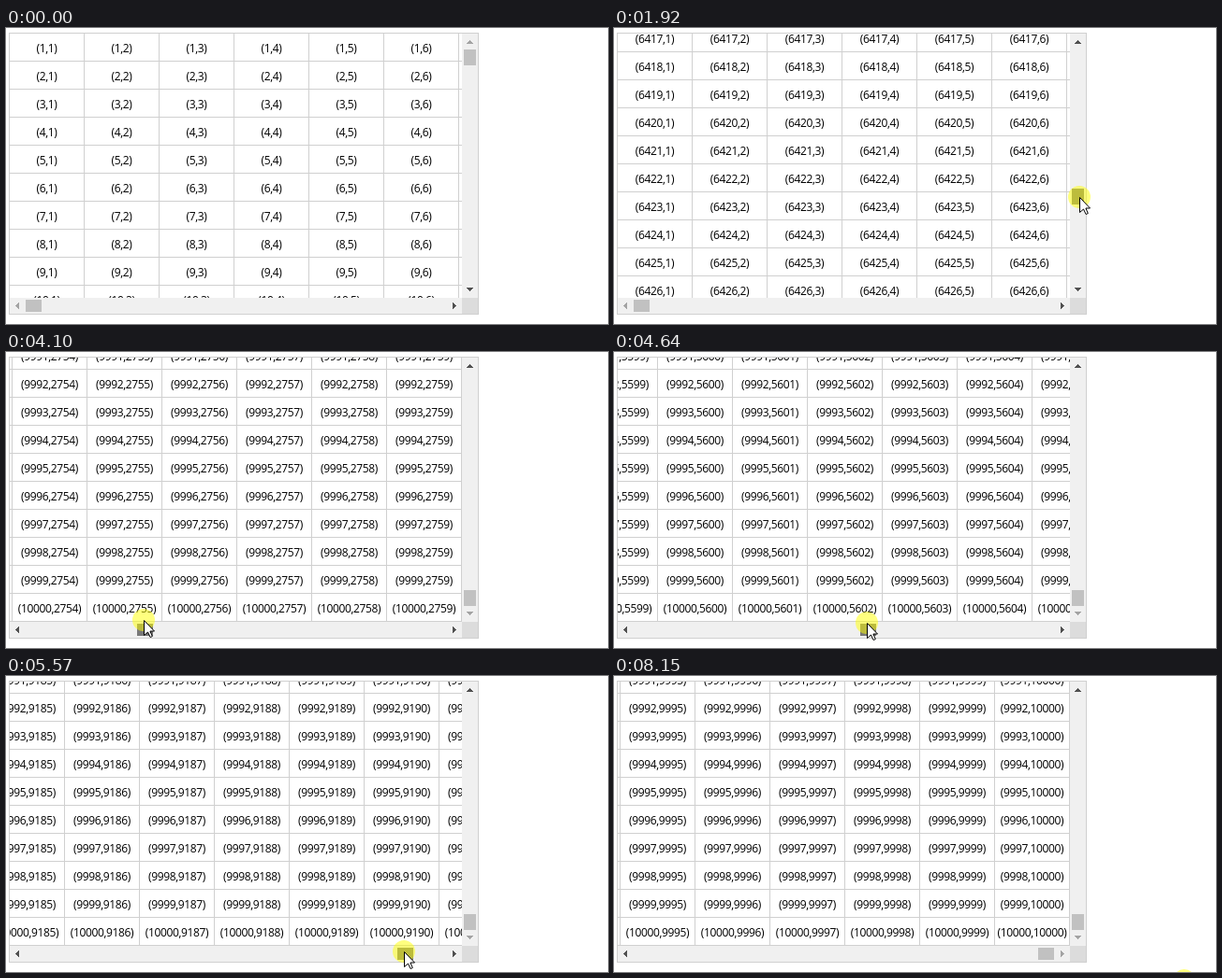
An HTML page with a canvas that plays this animation: 643x317 px, repeating every 8.23 s.

```html
<!DOCTYPE html>
<html lang="en">
<head>
<meta charset="utf-8">
<title>Virtual scrolling grid</title>
<style>
html, body { margin: 0; width: 100%; height: 100%; overflow: hidden; background: #fff; }
canvas { display: block; }
</style>
</head>
<body>
<canvas id="stage" width="643" height="317"></canvas>
<script>
const ctx = document.getElementById('stage').getContext('2d', { alpha: false });

const LOOP = 8230, FIRST_STEP = 208, STEP = 77.6;
const VIEW = { x: 4, y: 6, w: 483, h: 283 };
const CELL = { w: 80, h: 30 };
const COUNT = 10000;
const TRAVEL = { x: 432, y: 232 };           // thumb range in pixels
const DRAG_Y = [11, 30], DRAG_X = [43, 75];  // first and last step of each drag
const LAST_CLICK = 102;
const LINE = '#d0d0d0', BAR = '#f0f0f0';

const clamp = (v, lo, hi) => Math.min(hi, Math.max(lo, v));
const linear = f => f;
const easeIn = f => f * f;
const easeOut = f => 1 - (1 - f) ** 2;

// Each leg continues where the one before it ended; the pointer rests in the gaps.
const ENTRY = { x: 533, y: 275 };
const leg = (from, to, x, y, ease = linear) => ({ from, to, x, y, ease });
const LEGS = [
  leg(0, 10, 496, 32, easeOut),    // to the vertical thumb
  leg(11, 30, 498, 288.5),         // drag to the last row
  leg(30, 35, 150, 296, easeIn),   // to the horizontal thumb
  leg(35, 41, 28, 292, easeOut),
  leg(43, 50, 147, 287),           // drag to the last column
  leg(50, 64, 393, 293),
  leg(64, 75, 464, 297),
  leg(76, 78, 477, 297),           // release and leave
  leg(82, 88, 408, 247, easeOut),
  leg(88, 93, 543, 293),
  leg(93, 98, 609, 326)
];

function pointerAt(step) {
  let { x, y } = ENTRY;
  for (const { from, to, x: endX, y: endY, ease } of LEGS) {
    const f = ease(clamp((step - from) / (to - from), 0, 1));
    x += (endX - x) * f;
    y += (endY - y) * f;
  }
  return { x: Math.round(x), y: Math.round(y) };
}

function thumbOffset(axis, step, [from, to]) {
  const moved = pointerAt(clamp(step, from, to))[axis] - pointerAt(from)[axis];
  return clamp(moved, 0, TRAVEL[axis]);
}

function rect(color, x, y, w, h) {
  ctx.fillStyle = color;
  ctx.fillRect(x, y, w, h);
}

function drawGrid(thumb) {
  const left = Math.floor(thumb.x / TRAVEL.x * (COUNT * CELL.w - VIEW.w));
  const top = Math.floor(thumb.y / TRAVEL.y * (COUNT * CELL.h - VIEW.h));
  const firstCol = Math.floor(left / CELL.w), firstRow = Math.floor(top / CELL.h);

  ctx.save();
  ctx.beginPath();
  ctx.rect(VIEW.x, VIEW.y, VIEW.w, VIEW.h);
  ctx.clip();
  ctx.font = '12px "Open Sans", "Noto Sans", sans-serif';
  ctx.letterSpacing = '-0.35px';
  ctx.textAlign = 'center';
  for (let row = firstRow; row < Math.min(COUNT, firstRow + 11); row++) {
    const y = VIEW.y + row * CELL.h - top;
    rect(LINE, VIEW.x, y + CELL.h - 1, VIEW.w, 1);
    for (let col = firstCol; col < Math.min(COUNT, firstCol + 8); col++) {
      const x = VIEW.x + col * CELL.w - left;
      rect(LINE, x + CELL.w - 1, y, 1, CELL.h);
      ctx.fillStyle = '#000';
      ctx.fillText(`(${row + 1},${col + 1})`, x + 39.5, y + 20);
    }
  }
  ctx.restore();
}

// dx, dy: direction the arrow points to
function drawArrow(x, y, dx, dy, enabled) {
  ctx.fillStyle = enabled ? '#505050' : '#a3a3a3';
  for (let half = 0; half < 4; half++) {
    const along = 2 - half, size = half * 2 + 1;
    if (dx) ctx.fillRect(x + dx * along, y - half, 1, size);
    else ctx.fillRect(x - half, y + dy * along, size, 1);
  }
}

function drawThumb(x, y, w, h, pointer, dragging) {
  const hover = pointer && pointer.x >= x && pointer.x < x + w && pointer.y >= y && pointer.y < y + h;
  rect(dragging ? '#787878' : hover ? '#a8a8a8' : '#c1c1c1', x, y, w, h);
}

function drawScrollbars(thumb, pointer, draggingX, draggingY) {
  rect(BAR, 487, 6, 17, 283);
  rect(BAR, 4, 289, 483, 17);
  rect('#dcdcdc', 487, 289, 17, 17);
  drawArrow(495, 15, 0, -1, thumb.y > 0);
  drawArrow(495, 279, 0, 1, thumb.y < TRAVEL.y);
  drawArrow(12, 297, -1, 0, thumb.x > 0);
  drawArrow(478, 297, 1, 0, thumb.x < TRAVEL.x);
  drawThumb(489, 23 + thumb.y, 13, 17, pointer, draggingY);
  drawThumb(21 + thumb.x, 291, 17, 13, pointer, draggingX);
}

function drawHighlight({ x, y }) {
  ctx.fillStyle = 'rgba(255, 255, 0, .5)';
  ctx.beginPath();
  ctx.arc(x, y, 12, 0, Math.PI * 2);
  ctx.fill();
}

const ARROW = new Path2D('M0 0V16L4 12.5L6.6 18L8.8 17L6.4 11.5H11Z');

function drawPointer({ x, y }) {
  ctx.save();
  ctx.translate(x + .5, y + .5);
  ctx.fillStyle = '#fff';
  ctx.fill(ARROW);
  ctx.strokeStyle = '#000';
  ctx.stroke(ARROW);
  ctx.restore();
}

function draw(time) {
  const step = Math.floor((time % LOOP - FIRST_STEP) / STEP);
  const during = ([from, to]) => step >= from && step <= to;
  const draggingX = during(DRAG_X), draggingY = during(DRAG_Y);
  const pointer = step >= 0 ? pointerAt(step) : null;
  const thumb = {
    x: thumbOffset('x', step, DRAG_X),
    y: thumbOffset('y', step, DRAG_Y)
  };

  rect('#fff', 0, 0, 643, 317);
  drawGrid(thumb);
  drawScrollbars(thumb, pointer, draggingX, draggingY);
  ctx.strokeStyle = LINE;
  ctx.lineWidth = 1;
  ctx.strokeRect(3.5, 5.5, 501, 301);
  if (draggingX || draggingY || step >= LAST_CLICK) drawHighlight(pointer);
  if (pointer) drawPointer(pointer);
}

const start = performance.now();
function tick() {
  draw(performance.now() - start);
  requestAnimationFrame(tick);
}
tick();
</script>
</body>
</html>
```
